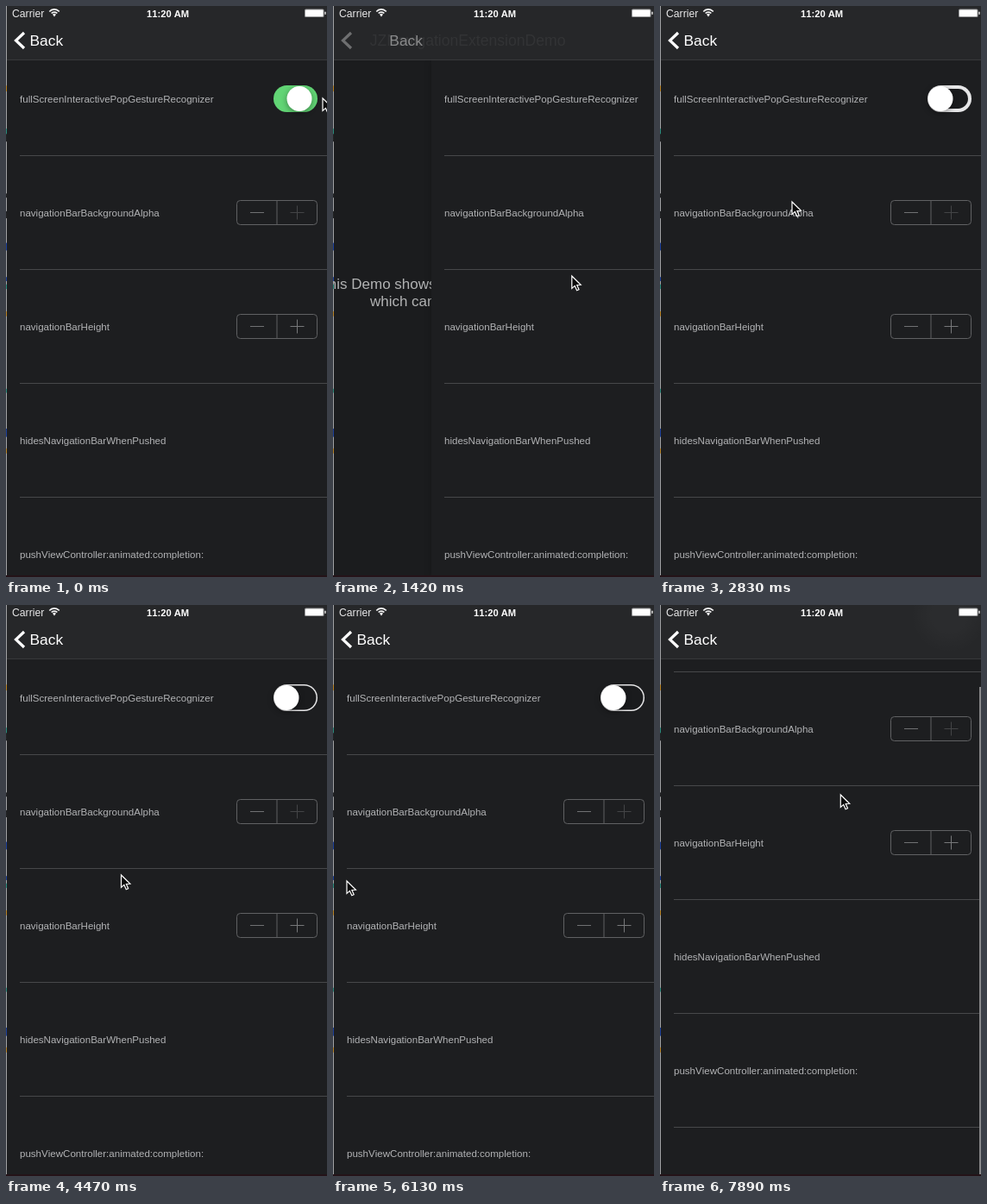
Recreate the animation shown at these times as an HTML page with a canvas. Size 372 by 662 pixels, loop 8 s.

```html
<!DOCTYPE html>
<html lang="en">
<head>
<meta charset="utf-8">
<title>Navigation demo</title>
<style>
  html, body { margin: 0; width: 100%; height: 100%; overflow: hidden; background: #1d1e20; }
  canvas { display: block; width: 372px; height: 662px; }
</style>
</head>
<body>
<canvas id="stage" width="372" height="662"></canvas>
<script>
const W = 372, H = 662, BAR = 63, ROW = 132, FIRST = 107.5;
const LOOP = 8000, STEP = 117.7;
const PAGE = '#1d1e20';
const SANS = '"Liberation Sans", Arial, sans-serif';
const LABELS = [
  'fullScreenInteractivePopGestureRecognizer',
  'navigationBarBackgroundAlpha',
  'navigationBarHeight',
  'hidesNavigationBarWhenPushed',
  'pushViewController:animated:completion:'
];
const ctx = document.getElementById('stage').getContext('2d');
ctx.fontKerning = 'none';

// Moments of the story, in steps
const SWIPE = { from: 5, to: 16, reach: 124 };
const EDGE_SWIPE = { from: 45, to: 52, reach: 58.5 };
const OFF = 21, ON = 56, SCROLL = 63;

// Places where the pointer rests
const MIDDLE = [164, 313], SWITCH = [335, 106], EDGE = [16, 320], LOW = [240, 316];
const STOPS = [
  [0, [367, 107]], [SWIPE.from - 1, MIDDLE], [SWIPE.to + 1, MIDDLE],
  [OFF - 1, SWITCH], [OFF, SWITCH], [24, [153, 227]], [27, [37, 303]],
  [42, [222, 318]], [43, [222, 318]], [EDGE_SWIPE.from, EDGE], [EDGE_SWIPE.to, EDGE],
  [ON - 1, SWITCH], [ON, SWITCH], [58, [390, 110]], [60, [390, 150]], [SCROLL, LOW]
];

const swing = (k, s) =>
  k > s.from && k < s.to ? s.reach * Math.sin(Math.PI * (k - s.from) / (s.to - s.from)) : 0;

const scrolled = k => k > SCROLL ? 96 * Math.sin(Math.min(1, (k - SCROLL) / 4) * Math.PI / 2) : 0;

function glide(k) {
  const i = STOPS.findIndex(s => s[0] > k);
  if (i < 0) return LOW;
  const [k0, a] = STOPS[i - 1], [k1, b] = STOPS[i];
  const f = (k - k0) / (k1 - k0), e = f * f * (3 - 2 * f);
  return a.map((v, n) => v + (b[n] - v) * e);
}

function pointer(k, offset, scroll) {
  // Swipes in vain while the gesture is off
  if (k > 27 && k <= 42) {
    return [139.5 - 126.5 * Math.cos((k - 33) / 6.6 * 2 * Math.PI), 302 + (k - 27)];
  }
  const [x, y] = glide(k);
  return [x + offset - scroll * 0.32, y - scroll];
}

function text(s, x, y, size, color, weight = '') {
  ctx.font = `${weight} ${size}px ${SANS}`;
  ctx.fillStyle = color;
  ctx.fillText(s, x, y);
}

function rect(x, y, w, h, color) {
  ctx.fillStyle = color;
  ctx.fillRect(x, y, w, h);
}

function line(points, color, width = 1) {
  ctx.beginPath();
  points.forEach(([x, y]) => ctx.lineTo(x, y));
  ctx.strokeStyle = color;
  ctx.lineWidth = width;
  ctx.stroke();
}

function pill(x, y, w, h, r, color) {
  ctx.beginPath();
  ctx.roundRect(x, y, w, h, r);
  ctx.fillStyle = color;
  ctx.fill();
}

function stepper(y, plus) {
  ctx.beginPath();
  ctx.roundRect(267.5, y - 14, 93, 28, 4);
  ctx.strokeStyle = '#606163';
  ctx.lineWidth = 1;
  ctx.stroke();
  line([[314, y - 14], [314, y + 14]], '#606163');
  line([[283, y], [299, y]], '#707173');
  line([[329.5, y], [345.5, y]], plus);
  line([[337.5, y - 8], [337.5, y + 8]], plus);
}

function toggle(k, y) {
  const on = k <= OFF || k > ON;
  const since = k <= OFF ? k + 1 : k - (on ? ON : OFF);
  const travel = k <= OFF ? 15 + 3 * Math.min(1, k) : Math.min(18, 8 * since);
  const cx = 325 + (on ? travel : 18 - travel);
  const x = 310, top = y - 15.5;

  if (on) {
    pill(x, top, 51, 31, 15.5, since === 1 ? '#62d575' : '#52d868');
  } else {
    const ring = 1.5 + 13 * Math.pow(0.58, since);
    pill(x, top, 51, 31, 15.5, '#e6e6e7');
    pill(x + ring, top + ring, 51 - 2 * ring, 31 - 2 * ring, 15.5 - ring, '#1a1b1d');
  }
  ctx.save();
  ctx.shadowColor = 'rgba(0,0,0,.4)';
  ctx.shadowBlur = 7;
  ctx.shadowOffsetY = 2;
  pill(cx - 14.5, y - 14.5, 29, 29, 14.5, '#fff');
  ctx.restore();
}

function page(k, offset, scroll) {
  ctx.save();
  ctx.translate(Math.round(offset), 0);
  if (offset) {
    ctx.shadowColor = 'rgba(0,0,0,.2)';
    ctx.shadowBlur = 8;
  }
  rect(1, BAR, W, H - BAR, PAGE);
  ctx.shadowColor = 'transparent';
  ctx.translate(0, -Math.round(scroll));
  LABELS.forEach((s, i) => {
    const y = FIRST + ROW * i;
    text(s, 16, y + 4, 11.55, '#b2b3b5');
    line([[16, y + 66], [W, y + 66]], '#47484a');
  });
  toggle(k, FIRST);
  stepper(FIRST + ROW, '#434446');
  stepper(FIRST + 2 * ROW, '#77787a');
  ctx.restore();
}

function previous(offset) {
  const dx = 0.3 * offset;
  rect(1, BAR, W, H - BAR, PAGE);
  text('This Demo shows some features', dx - 49.4, 327.5, 17, '#bfc0c1');
  text('which can be set.', dx + 9.1, 347.5, 17, '#bfc0c1');
  rect(1, BAR, W, H - BAR, `rgba(0,0,0,${0.1 * (1 - offset / W)})`);
}

function arc(r) {
  ctx.beginPath();
  ctx.arc(56, 11.5, r, -Math.PI * 0.77, -Math.PI * 0.23);
}

function status() {
  text('Carrier', 7, 12.5, 12.2, '#e8e8e9');
  ctx.strokeStyle = ctx.fillStyle = '#f4f4f4';
  ctx.lineWidth = 1.6;
  for (const r of [4.4, 7.6]) {
    arc(r);
    ctx.stroke();
  }
  arc(2.6);
  ctx.lineTo(56, 12.5);
  ctx.fill();
  text('11:20 AM', 163, 12.5, 11.2, '#fff', 'bold');
  pill(346, 3.5, 22.5, 9.5, 1.5, '#9b9c9d');
  pill(347, 4.5, 20.5, 7.5, 1, '#fff');
  pill(369.2, 6.5, 1.6, 3.5, 0.8, '#d0d0d0');
}

function bar(offset, scroll) {
  rect(1, 0, W, BAR, '#262729');
  if (scroll) {
    // The switch shines faintly through the bar
    const y = FIRST - scroll;
    const glow = ctx.createRadialGradient(335, y, 20, 335, y, 44);
    glow.addColorStop(0, 'rgba(255,255,255,.025)');
    glow.addColorStop(1, 'rgba(255,255,255,0)');
    rect(290, 0, 82, BAR, glow);
  }
  rect(1, BAR - 1, W, 1, '#37383a');

  const p = offset / W;
  if (offset) {
    ctx.globalAlpha = 0.2 * p;
    text('JZNavigationExtensionDemo', 30 + 0.112 * offset, 46, 17.6, '#fff');
    if (p < 0.2) text('Push', 320, 46, 17.4, '#fff');
  }
  ctx.globalAlpha = offset ? 0.85 - 1.3 * p : 1;
  text('Back', 27.5 + 0.335 * offset, 46, 17.4, '#fff');
  ctx.globalAlpha = offset ? 0.85 - 1.7 * p : 1;
  line([[21, 31], [11.5, 40], [21, 49]], '#fff', 3.2);
  ctx.globalAlpha = 1;
  status();
}

function random(n) {
  const v = Math.sin(n * 12.9898) * 43758.5453;
  return v - Math.floor(v);
}

// Slivers of the desktop behind the window
function edges() {
  const tints = ['#222324', '#1c3f9a', '#b98222', '#2a8c7c'];
  rect(0, 0, 1, H, '#a0a1a3');
  for (let i = 1; i <= 12; i++) {
    rect(0, 66 + 460 * random(i), 1, 4 + 6 * random(i + 40), tints[i % 4]);
  }
  rect(0, H - 2, W, 2, '#241318');
}

function arrow(x, y) {
  ctx.save();
  ctx.translate(x, y);
  ctx.beginPath();
  [[0, 0], [0, 14.5], [3.4, 11.4], [5.8, 16.8], [8.2, 15.7], [5.9, 10.5], [10.4, 10.3]]
    .forEach(p => ctx.lineTo(...p));
  ctx.closePath();
  ctx.fillStyle = '#0a0a0a';
  ctx.fill();
  ctx.strokeStyle = '#fff';
  ctx.lineWidth = 1.2;
  ctx.stroke();
  ctx.restore();
}

function draw(t) {
  const k = Math.floor((t + 8) / STEP);
  const offset = swing(k, SWIPE) + swing(k, EDGE_SWIPE);
  const scroll = scrolled(k);

  if (offset) previous(offset);
  page(k, offset, scroll);
  if (scroll) {
    const top = BAR + scroll / 3;
    rect(370, top, 2, H - 2 - top, '#89898b');
  }
  bar(offset, scroll);
  edges();
  arrow(...pointer(k, offset, scroll));
}

const start = performance.now();
function tick() {
  draw((performance.now() - start) % LOOP);
  requestAnimationFrame(tick);
}
tick();
</script>
</body>
</html>
```
